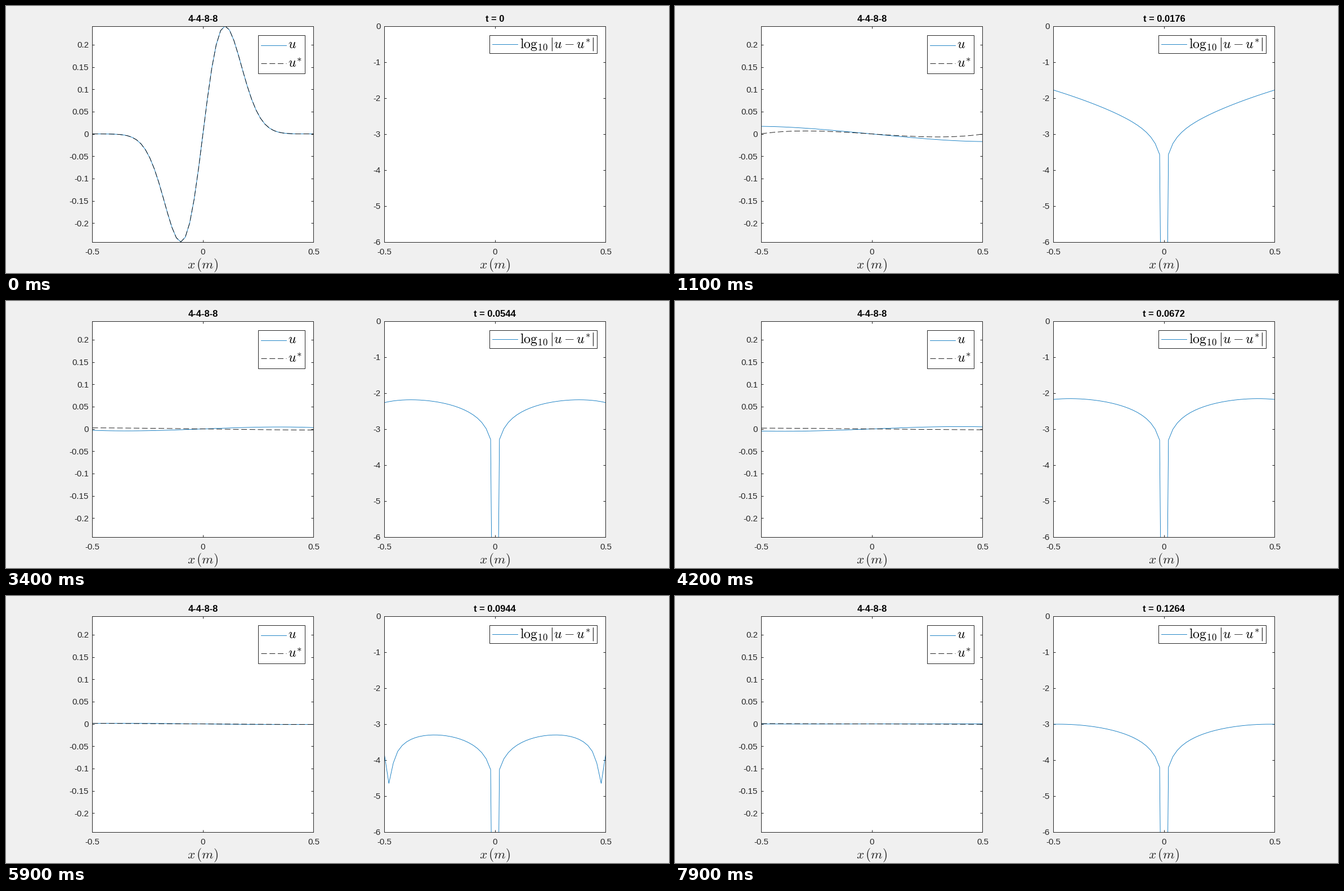
A matplotlib script for the animation above (8 s loop, 1178 by 475 pixels).

```python
import numpy as np
import matplotlib.pyplot as plt
from matplotlib.animation import FuncAnimation
from matplotlib.patches import Rectangle

W, H, DPI = 1178, 475, 100
FRAMES, INTERVAL = 80, 100
DT = 0.0016                 # simulated time per frame
SIGMA = 0.1                 # width of the initial pulse
SPREAD = 1034               # dispersion rate of the rod
PEAK = np.exp(-0.5) / np.sqrt(2 * np.pi)
INK, BLUE = "#262626", "#0072BD"
PX = 72 / DPI               # one pixel in points
THIN = 0.85 * PX            # plotted curves
DASH = (0, (11.8, 5.5))
NUDGE = 0.1                 # keeps half-pixel edges on the intended pixel

plt.rcParams["font.family"] = "Liberation Sans"
plt.rcParams["mathtext.fontset"] = "cm"

x = np.linspace(-0.5, 0.5, 51)
x[25] = 0.0

# Key points of the boundary reflection: slope at the centre, value at the edge
KEY_T = np.array([0, 0.0176, 0.0368, 0.0544, 0.08, 0.0944, 0.1264])
SLOPE = np.array([0, 0.0134, 0.0361, -0.0255, -0.0076, 0.0027, -0.0031])
EDGE = np.array([0, 0.0166, 0.0115, -0.0054, -0.0033, -0.00014, -0.00098])


def smooth(t, values):
    """Hermite interpolation through the key points, starting at rest."""
    rate = np.gradient(values, KEY_T)
    rate[0] = 0
    i = int(np.clip(np.searchsorted(KEY_T, t) - 1, 0, len(KEY_T) - 2))
    h = KEY_T[i + 1] - KEY_T[i]
    q = (t - KEY_T[i]) / h
    return (values[i] + (values[i + 1] - values[i]) * q**2 * (3 - 2 * q)
            + h * q * (1 - q) * (rate[i] * (1 - q) - rate[i + 1] * q))


def exact(t):
    """Dispersing pulse on an unbounded rod."""
    z = 1 + 1j * SPREAD * t
    pulse = x * np.exp(-x**2 / (2 * SIGMA**2 * z)) / z**1.5
    return pulse.real / (SIGMA * np.sqrt(2 * np.pi))


def reflection(t):
    """Odd cubic with the current centre slope and edge value."""
    slope, edge = smooth(t, SLOPE), smooth(t, EDGE)
    return -(slope * x + (edge - slope / 2) * (2 * x)**3)


fig = plt.figure(figsize=(W / DPI, H / DPI), dpi=DPI, facecolor="#f0f0f0")

# Overlay in pixel coordinates for text and legends
page = fig.add_axes([0, 0, 1, 1], zorder=2)
page.set(xlim=(NUDGE, W + NUDGE), ylim=(H - NUDGE, -NUDGE))
page.axis("off")


def label(px, py, text, size, ha="center", color=INK, **kw):
    return page.text(px, py, text, fontsize=size * PX, ha=ha,
                     va="baseline", color=color, **kw)


def panel(left, right, ylim, yticks):
    top, bottom = 35.5, 419.5
    ax = fig.add_axes([(left - NUDGE) / W, 1 - (bottom + NUDGE) / H,
                       (right - left) / W, (bottom - top) / H])
    ax.set(xlim=(-0.5, 0.5), ylim=ylim, xticks=[-0.5, 0, 0.5], yticks=yticks)
    ax.tick_params(direction="in", length=4 * PX, width=PX, color=INK,
                   top=True, right=True, labelleft=False, labelbottom=False)
    for spine in ax.spines.values():
        spine.set(linewidth=PX, color=INK)
    for v in yticks:
        py = bottom - (v - ylim[0]) / (ylim[1] - ylim[0]) * (bottom - top)
        label(left - 6.5, py + 5.4, f"{v:g}", 15, ha="right")
    for v in (-0.5, 0, 0.5):
        label(left + (v + 0.5) * (right - left), 441.5, f"{v:g}", 15)
    label((left + right) / 2, 467, r"$x\,(m)$", 23.3)
    return ax


def legend(left, right, bottom, rows):
    page.add_patch(Rectangle((left, 51.5), right - left, bottom - 51.5,
                             facecolor="white", edgecolor=INK, lw=PX))
    for py, base, text_x, text, color, style in rows:
        page.plot([left + 4.5, left + 49.5], [py, py], color=color,
                  ls=style, lw=THIN)
        label(text_x, base, text, 24, ha="left", color="black")


ax_u = panel(153.5, 546.5, (-PEAK, PEAK),
             [round(0.05 * i, 2) for i in range(-4, 5)])
ax_err = panel(672.5, 1065.5, (-6, 0), list(range(-6, 1)))

legend(448.5, 531.5, 119.5, [
    (69.5, 75, 501, r"$u$", BLUE, "-"),
    (101.5, 109, 501, r"$u^{*}$", "black", DASH),
])
legend(859.5, 1050.5, 83.5, [
    (67.5, 74, 913, r"$\log_{10}|u-u^{*}|$", BLUE, "-"),
])

label(350, 28, "4-4-8-8", 16.5, color="black", weight="bold")
title = label(869, 28, "", 16.5, color="black", weight="bold")

line_u, = ax_u.plot([], [], color=BLUE, lw=THIN)
line_exact, = ax_u.plot([], [], color="black", lw=THIN, ls=DASH)
line_err, = ax_err.plot([], [], color=BLUE, lw=THIN)


def draw(k):
    t = k * DT
    u_exact, err = exact(t), reflection(t)
    line_u.set_data(x, u_exact + err)
    line_exact.set_data(x, u_exact)
    line_err.set_data(x, np.log10(np.maximum(np.abs(err), 1e-17)))
    title.set_text(f"t = {t:.4g}")
    return line_u, line_exact, line_err, title


anim = FuncAnimation(fig, draw, frames=FRAMES, interval=INTERVAL,
                     repeat=True, repeat_delay=0, blit=False)
plt.show()
```
